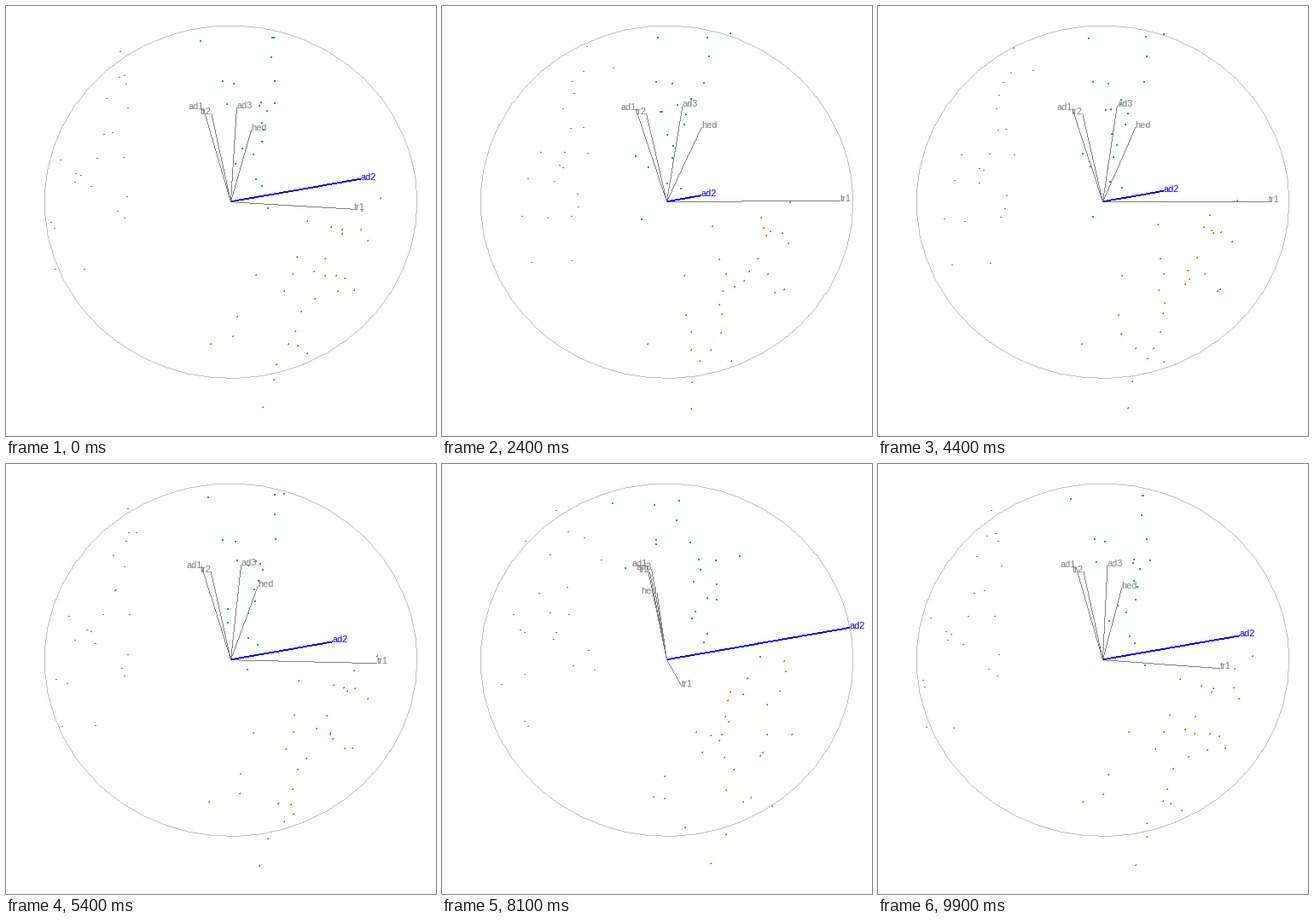
Recreate the animation shown at these times as a matplotlib script. Size 504 px wide and 504 px high, loop 10000 ms.

```python
import numpy as np
import matplotlib.pyplot as plt
from matplotlib.animation import FuncAnimation
from matplotlib.colors import to_rgb

SIZE, DPI = 504, 72
CX, CY, RX, RY = 263, 229.2, 218.4, 206.8
SLOPE, SKEW = 0.174, 0.186      # direction of the swing, and its normal, in pixels
START, STEP = 0.78, 0.05        # swing angle in radians
FAR, NEAR = START + 14 * STEP, START - 14 * STEP

GREY, BLUE, RIM = "#7f7f7f", "#0000ff", "#bebebe"

# Arm tips: x, y in the far pose, then x in the near pose.
ARMS = {
    "tr1": (469.5, 227, 280.5), "tr2": (239, 126.5, 243),
    "hed": (304.5, 141.5, 251.5), "ad1": (227, 121, 240),
    "ad2": (282, 225.9, 477), "ad3": (282, 116.5, 245),
}


def cluster(rng, n, center, spread, lean):
    """Random poses (x far, y, x near); both x values lean with y."""
    z = rng.normal(size=(n, 3))
    z = np.clip((z - z.mean(0)) / z.std(0), -2.2, 2.2) * spread
    z[:, 0] += lean[0] * z[:, 1]
    z[:, 2] += lean[1] * z[:, 1]
    return z + center


rng = np.random.default_rng(7)
SQUARE = [(0, 0), (1, 0), (0, 1), (1, 1)]
CORNER = [(1, 0), (0, 1), (1, 1)]
DASH = [(0, 0), (1, 0)]
GROUPS = [
    ("#1b9e77", SQUARE,
     cluster(rng, 21, (269, 129, 290), (22, 60, 31), (-0.34, 0.36))),
    ("#d95f02", CORNER,
     cluster(rng, 31, (335, 335, 340), (30, 62, 44), (-0.45, 0.09))),
    ("#7570b3", DASH,
     cluster(rng, 22, (155, 175, 127), (21, 70, 38), (-0.25, 0.19))),
]


def swing(poses, phi):
    """Rotate points about the fixed normal by blending the two poses."""
    x, y, x_near = np.array(poses, float).T
    c = (y - CY) + SLOPE * (x - CX)
    far, near = x - CX - SKEW * c, x_near - CX - SKEW * c
    along = (far * np.sin(phi - NEAR) + near * np.sin(FAR - phi)) / np.sin(FAR - NEAR)
    dx = along + SKEW * c
    return CX + dx, CY + c - SLOPE * dx


def angle(i):
    """Slow first part, double speed later; one held step at each turn."""
    s = i // 2 if i < 72 else i - 36
    if s < 16:
        k = s
    elif s < 48:
        k = 31 - s
    else:
        k = s - 64
    return START + STEP * k


def plot(img, x, y, color):
    x, y = np.rint(x).astype(int), np.rint(y).astype(int)
    ok = (x >= 0) & (x < SIZE) & (y >= 0) & (y < SIZE)
    img[y[ok], x[ok]] = to_rgb(color)


def line(img, x0, y0, x1, y1, color, width=1):
    """Hard-edged line, one pixel per step of the longer axis."""
    n = int(max(abs(x1 - x0), abs(y1 - y0))) + 1
    x, y = np.linspace(x0, x1, n + 1), np.linspace(y0, y1, n + 1)
    for w in range(width):
        plot(img, x, y - w, color)


fig = plt.figure(figsize=(SIZE / DPI, SIZE / DPI), dpi=DPI, facecolor="white")
ax = fig.add_axes([0, 0, 1, 1])
ax.axis("off")

base = np.ones((SIZE, SIZE, 3))
t = np.linspace(0, 2 * np.pi, 50)
rim = np.column_stack([CX + RX * np.cos(t), CY + RY * np.sin(t)])
for p, q in zip(rim, rim[1:]):
    line(base, *p, *q, RIM)

canvas = ax.imshow(base, extent=(0, SIZE, SIZE, 0), interpolation="nearest",
                   aspect="auto")
labels = [ax.text(0, 0, name, color=BLUE if name == "ad2" else GREY, fontsize=11,
                  family="Liberation Sans", va="baseline") for name in ARMS]


def draw(i):
    phi = angle(i)
    img = base.copy()
    tips = zip(*swing(list(ARMS.values()), phi))
    for label, (x, y) in zip(labels, tips):
        active = label.get_text() == "ad2"
        line(img, CX, CY, x, y, BLUE if active else GREY, 2 if active else 1)
        label.set_position((x + 0.5, y + 1))
        label.set_ha("left" if x > CX else "right")
    for color, shape, poses in GROUPS:
        x, y = swing(poses, phi)
        for dx, dy in shape:
            plot(img, np.floor(x) + dx, np.floor(y) + dy, color)
    canvas.set_data(img)
    return [canvas, *labels]


anim = FuncAnimation(fig, draw, frames=100, interval=100, repeat=True,
                     repeat_delay=0, blit=False)
plt.show()
```
